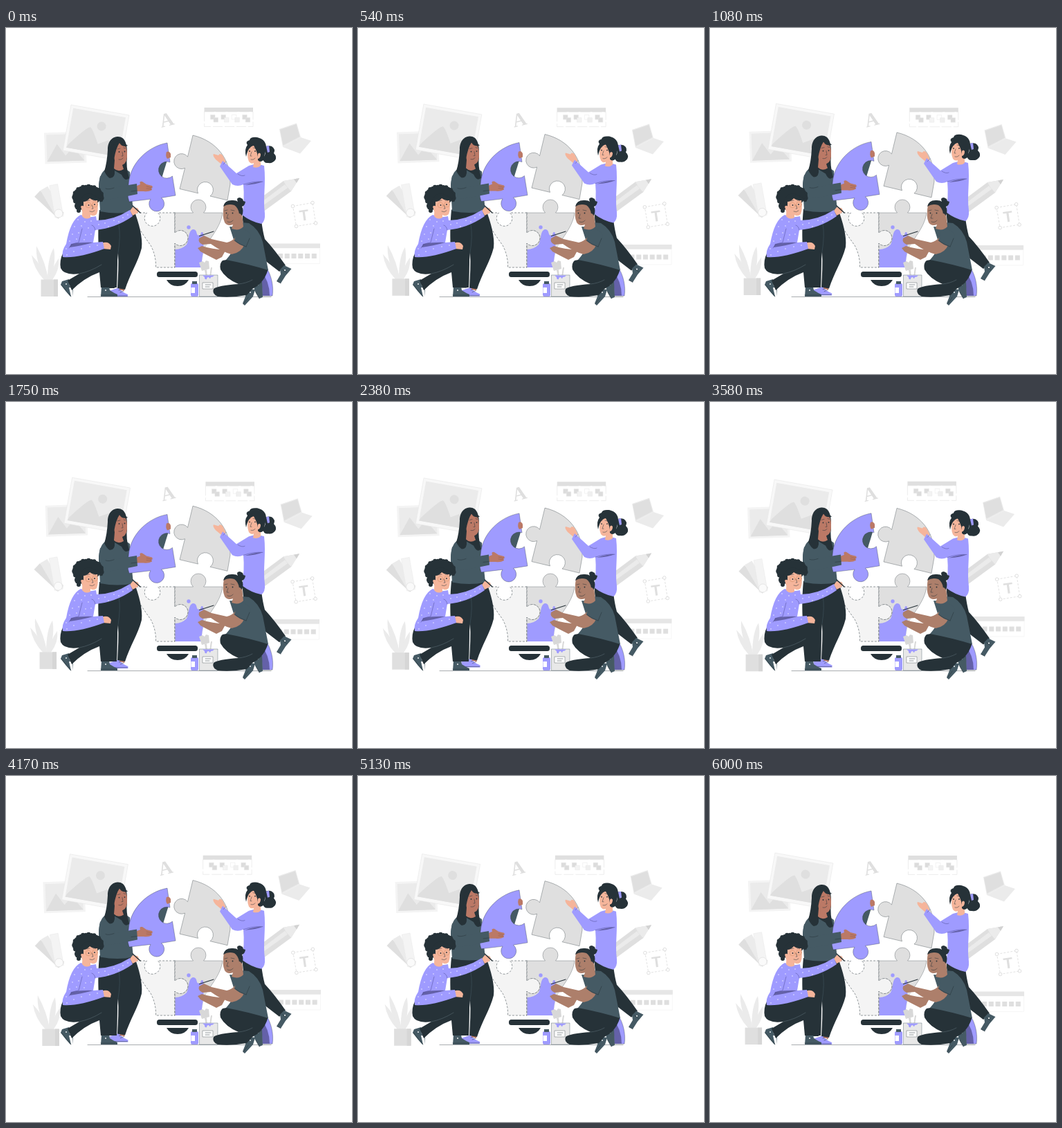
An HTML page for the animation above (6040 ms loop, 500x500 px).

```html
<!DOCTYPE html>
<html lang="en">
<head>
<meta charset="utf-8">
<title>Team building a bulb</title>
<style>
html, body { margin: 0; width: 100%; height: 100%; overflow: hidden; background: #fff }
svg { display: block; width: 100vw; height: 100vh }
.d { fill: #263238 } .t { fill: #455a64 } .p { fill: #9f9bff } .w { fill: #fff }
.b { fill: #bb7966 } .m { fill: #ad7f6b } .s { fill: #f5b59b } .v { fill: #6461a8 }
.g0 { fill: #f4f4f4 } .g1 { fill: #ebebeb } .g2 { fill: #dfdfdf }
.l { fill: none; stroke: #263238; stroke-width: .5; stroke-linecap: round }
.o { stroke: #263238; stroke-width: .35 }
.dash { stroke-dasharray: 3 2; stroke-width: .5 }
.f { fill: none; stroke: #e6e6e6; stroke-width: .7 }
</style>
</head>
<body>
<svg viewBox="0 0 500 500">
<!-- background objects -->
<g data-m="drift 1.7 -1.9">
  <g transform="translate(55 151.5) rotate(-2)">
    <path class="g0" d="M0 0H60V45H0z"/><path class="g1" d="M3 3H57V42H3z"/>
    <path class="g2" d="M3 42L18 17 30 34 41 22 57 42z"/>
  </g>
  <g transform="translate(94 111) rotate(10.1)">
    <path d="M0 0H85.3V67H0z" fill="#f8f8f8" stroke="#e8e8e8" stroke-width=".6"/>
    <path class="g1" d="M4 4H81V62H4z"/>
    <circle class="g2" cx="48.8" cy="22.8" r="6.5"/>
    <path class="g2" d="M4 62L6 57Q28 28 33 27Q36 27 48 49L62 41 81 59V62z"/>
  </g>
</g>
<g data-m="drift 1.8 -.4">
  <text class="g2" transform="translate(224.5 144) rotate(-14)" font-family="Liberation Serif, serif" font-weight="700" font-size="28">A</text>
</g>
<g data-m="drift 2 .3">
  <path class="f" d="M286.5 121H357V142.5H286.5z" stroke-dasharray="14 3"/>
  <path class="g2" d="M286.5 115H357V121H286.5z"/>
  <g id="icons"></g>
</g>
<g data-m="drift 1.7 1.7">
  <path class="g1" d="M395 146L420 137.5 426 158 400 172z"/>
  <path class="g2" d="M396 147L419.500 139 424.500 157 400.500 169.500z"/>
  <path class="g1" d="M400 172L426 158 441 163 425 181.500z"/>
</g>
<g data-m="drift 0 2.3">
  <path class="g2" d="M424 217L401 221 366 247 371 266 412 236z"/>
  <path class="g1" d="M424 217L401 221 405 228 412 236z"/>
  <path class="g1" d="M403 226L366 254 368 259 407 231z"/>
  <path fill="#d2d2d2" d="M424 217L416 218.500 420 224z"/>
</g>
<g data-m="drift -.4 2.4">
  <path class="f" d="M414.500 257.500L443 252.500 447.500 282 419.500 286.500z" stroke-dasharray="3 2" style="stroke:#d6d6d6"/>
  <g fill="#fff" stroke="#d6d6d6" stroke-width=".8"><circle cx="414.500" cy="257.500" r="2.300"/><circle cx="443" cy="252.500" r="2.300"/><circle cx="447.500" cy="282" r="2.300"/><circle cx="419.500" cy="286.500" r="2.300"/></g>
  <text class="g2" transform="translate(432 278) rotate(-8)" text-anchor="middle" font-family="Liberation Sans, sans-serif" font-weight="700" font-size="22">T</text>
</g>
<g data-m="drift -1 2.7">
  <path class="f" d="M379 318H453.500V340.500H379z" style="stroke:#f3f3f3"/>
  <path fill="#e6e6e6" d="M379 311.500H454V318H379z"/>
  <path d="M393 329.500H449" fill="none" stroke="#dfdfdf" stroke-width="7" stroke-dasharray="7 2.75"/>
</g>
<g data-m="drift -.6 -1.8">
  <g transform="translate(76 268)">
    <path class="g2" d="M-6 5V-42H6V5z" transform="rotate(-47)"/>
    <path class="g1" d="M-6 5V-42H6V5z" transform="rotate(-30)"/>
    <path class="g0" d="M-6 5V-42H6V5z" transform="rotate(-10)" stroke="#e8e8e8" stroke-width=".5"/>
    <circle r="6" fill="#fafafa" stroke="#dedede" stroke-width=".7"/>
  </g>
</g>
<g data-m="drift -2 -2.2">
  <g class="g1">
    <path d="M55 364Q40 348 37 328Q53 345 60 364z"/><path d="M57 364Q42 336 44 315Q58 340 61 364z"/>
    <path d="M60 364Q60 332 69 318Q73 338 64 364z"/><path d="M62 364Q66 347 76 333Q78 349 67 364z"/>
    <path d="M57 364Q49 354 52 342Q60 352 61 364z"/>
  </g>
  <path class="g2" d="M50.500 363.500H75V388H50.500z"/><path fill="#d6d6d6" d="M69 363.500H75V388H69z"/>
</g>

<path class="l" d="M118 388.500H383" style="stroke-width:.4"/>

<!-- lower half of the bulb -->
<path class="g0 o dash" d="M183 267H203.500A11.300 11.300 0 1 0 219.500 267H244V346H216.500Q217 329 209 314C199 300 187 284 183 267z"/>
<path class="g2" d="M244 267H270.500A11 11 0 1 1 285.500 267H313C311 284 300 297 292 310Q283 325 282.500 346H244z"/>
<path class="l" d="M244 267H270.500A11 11 0 1 1 285.500 267H313C311 284 300 297 292 310" style="stroke-width:.3"/>
<path class="p" d="M244.500 346V320Q254 320 261 313C265 306 263 293 270 291C277 290 274 300 279 300C283 300 280 294 284 295C288 300 284 310 286 320Q283 330 282.500 346z"/>
<circle class="p" cx="264" cy="288" r="2.700"/>
<path class="g0" d="M243 296A11 11 0 1 1 243 311z"/>
<path class="l dash" d="M244 267V296A11 11 0 1 1 244 311V346"/>
<rect class="d" x="218" y="352" width="59" height="8" rx="3.500"/>
<path class="d" d="M232 364H264Q259 373 248 373T232 364z"/>

<!-- paint supplies -->
<g fill="#d8d8d8"><path d="M279 339L284 337 287 339 289 336 293 337 294 348 283 351z"/><path d="M287 350L290 349 291 360H289zM296 346L298 346 296 360H294z"/></g>
<path fill="#e8e8e8" stroke="#455a64" stroke-width=".4" d="M279.500 357H306V388H279.500z"/>
<path class="p" d="M284 357.500H301Q299 360 296 360Q295 364 293 360Q290 360 290 363Q287 364 287 360z"/>
<path class="w o" d="M284 368H299V377H284z"/><path class="l" d="M288 371H296M288 374H294"/>
<rect class="p" x="267" y="369" width="11" height="19" rx="2"/><path class="t" d="M269 366H276V370H269z"/>
<path class="w" d="M267.500 375H273V383H267.500z"/>

<!-- standing woman, left -->
<g data-m="slow 2.5 -4"><path d="M200 205L218 190 233 191 225 217 210 220z" fill="#455a64"/></g>
<g data-m="slow .6 -5">
  <path class="p" d="M149 388V380L163 375Q166 381 176 385V388z"/>
  <path class="l" d="M149 387H175M163 379L168 378M165 382L170 380"/>
  <path class="b" d="M163 372H171V380L164 378z"/>
</g>
<g data-m="slow 0 -5">
  <path class="d" d="M135 263H185C192 282 198 303 196 318C191 338 179 356 172 378L161 376C162 358 163 342 162 325L157 376H140C135 345 131 304 135 263z"/>
  <path class="l" d="M162 325Q166 300 163 285" style="stroke:#455a64"/>
  <path class="t" d="M147 203C138 206 134 216 134 232L136 265Q162 270 184 265L181 236 179 208Q172 203 169 203z"/>
</g>
<g data-m="slow 0 -5.7">
  <path class="p o" d="M233 166C205 171 179 195 177 226Q174 240 178 251L209 247.300A11 11 0 1 0 224.500 245.400L245 242 240.500 214A12 12 0 1 1 237 194z"/>
  <path class="b" d="M232 179Q236 177 238 182V187L233 189Q230 185 232 179z"/>
  <path class="b" d="M189 228L194 226Q192 221 197 222L203 226 211 228Q213 231 210 231L211 234Q206 237 199 236L189 236z"/>
  <path class="l" d="M203 229L211 231M203 232L210 233" style="stroke:#8d5646"/>
</g>
<g data-m="slow 0 -5">
  <path class="t" d="M136 214Q131 238 139 247Q145 250 190 240L189 225Q170 228 157 231L153 213z"/>
  <path class="l" d="M156 231Q148 234 144 232M181 236L189 235"/>
  <path class="d" d="M147 176C147 162 155 157 162 157C172 157 176 168 175 186Q173 200 178 217Q172 223 167 212L157 206Q158 217 150 217Q146 215 142 207Q146 195 147 176z"/>
  <path class="b" d="M154 178Q154 168 162 166Q175 166 175 181Q176 195 168 198L170 204Q162 209 156 203L157 191z"/>
  <path class="d" d="M153 188Q151 167 164 162L176 170Q168 173 164 166Q159 173 156 190z"/>
  <path class="l" d="M161 175L165 174M170 173L173 174M168 179L169 185 167 185M163 190Q167 191 169 188"/>
  <g class="d"><circle cx="163.500" cy="179" r=".9"/><circle cx="171.500" cy="178.500" r=".9"/></g>
</g>

<!-- standing woman, right -->
<g data-m="fast 0 -5">
  <path class="g2 o" d="M270 155C304 163 326 190 324 226L320 249 295 243A11.500 11.500 0 1 0 277.500 238.800L251 232.500 258.500 202.500A11 11 0 1 1 262.500 186z"/>
  <path class="d" d="M342 270L369 278Q371 294 374 305Q388 320 404 343L395 352 360 325Q341 298 342 270z"/>
  <path class="t" d="M402 343L412.500 348 404 358 397 369 391 366 397 356 396 349z"/>
  <path class="l" d="M399 349L406 354M392 366L397 369"/><circle cx="403" cy="350" r="1" class="w"/>
  <path class="s" d="M315 200L303 190Q298 184 300 182L307 184Q309 180 313 184L317 192z"/>
  <path class="p" d="M313 192L333 210 351 199Q362 195 373 199C376 225 371 245 374 268Q375 279 369 283Q354 280 341 270Q345 248 343 226Q335 230 327 226Q318 213 309 200z"/>
  <path class="v" d="M345 227Q359 222 371 222Q362 226 345 227z"/>
  <path class="l" d="M343 226Q358 221 371 222M335 211Q341 215 345 213M314 197L318 193" style="stroke:#4d4a91"/>
  <path class="d" d="M373 172Q379 169 384 171Q390 175 387 181Q392 186 389 191Q385 196 379 195Q372 196 371 188Q376 183 374 178z"/>
  <path class="s" d="M351 169Q347 184 351 193Q354 197 358 195L357 201Q364 203 368 199V178L364 165z"/>
  <path class="d" d="M347 186Q344 175 349 169Q345 164 352 162Q353 157 363 158Q376 161 376 173Q374 182 372 191Q367 195 364 191Q365 182 358 170Q350 171 347 186z"/>
  <path class="p" d="M376 171L380 170 381 179 378 180z"/>
  <path class="s" d="M364 182Q366 179 368 182Q368 188 364 189z"/>
  <path class="l" d="M350 174L353 173M357 173L361 174M355 179L353 185 355 185M354 190Q358 191 360 188"/>
  <g class="d"><circle cx="352" cy="178" r=".9"/><circle cx="360" cy="178" r=".9"/></g>
</g>

<!-- painter -->
<path class="p o" d="M344 339L375 344C384 357 387 374 385 387H370Q373 364 344 339z"/>
<path class="v" d="M368 350Q381 366 381 387H371z"/>
<path class="t" d="M356 366L370 367 371 389 366 391 360 381zM347 376L360 378 357 388 345 401 342 398 346 388z"/>
<path class="l" d="M366 391L361 382M343 399L350 389"/><g class="w"><circle cx="364" cy="371" r=".9"/><circle cx="353" cy="382" r=".9"/></g>
<path class="d" d="M313 336Q342 329 375 344Q380 348 377 354Q371 370 356 377L348 386Q325 390 306 388Q297 384 300 377Q306 372 336 370Q317 362 310 349Q308 340 313 336z"/>
<path class="l" d="M336 370Q347 369 356 364" style="stroke:#60727b"/>
<path class="m" d="M277 318L283 315Q302 321 318 320L312 331 304 335Q290 328 281 323z"/>
<path class="t" d="M323 287Q334 288 341 281L351 282Q366 291 371 309L379 350Q350 341 318 335Q328 324 331 312z"/>
<path class="m" d="M333 301L345 312Q340 325 326 327Q311 323 296 312L284 313Q277 310 279 304L286 300 297 305 319 310Q326 309 333 301z"/>
<path class="t" d="M336 287Q351 292 354 300L347 316Q337 314 330 307z"/>
<path class="l" d="M347 316L352 304M330 307Q338 313 347 316"/>
<path class="l" d="M278 301L300 294" style="stroke-width:1.2"/><path class="p" d="M273 302L279 299 279 302z"/>
<path class="m" d="M315 255Q312 273 316 281Q320 287 328 284L326 290Q337 294 343 287L340 258Q329 247 315 255z"/>
<path class="d" d="M314 258Q316 248 328 249Q333 249 335 251Q332 245 338 245L342 247 343 250 346 251Q345 257 341 258Q344 264 341 271L337 269Q336 260 330 256Q321 253 314 258z"/>
<path class="m" d="M335 270Q337 266 340 270Q340 276 335 277z"/>
<path class="l" d="M316 264L320 263M325 263L330 264M321 269L319 275 322 275M320 280Q325 282 328 278"/>
<g class="d"><circle cx="318.500" cy="267.500" r=".9"/><circle cx="327.500" cy="267.500" r=".9"/></g>

<!-- kneeling woman -->
<path class="t" d="M81 366L91 363 92 373 97 377V388H93L86 380 79 371zM138 374H149L150 379Q156 383 161 385V388H137z"/>
<path class="w" d="M91 375H96L97 388H94z"/>
<path class="l" d="M80 371L94 388M137 386H160"/><g class="w"><circle cx="87" cy="370" r=".9"/><circle cx="144" cy="379" r=".9"/></g>
<path class="d" d="M82 326Q120 312 150 317Q160 319 161 330Q161 355 160 375H137L135 353Q113 361 95 379L89 365 106 355Q84 358 79 347Q77 336 82 326z"/>
<path class="l" d="M106 355Q122 352 138 342" style="stroke:#60727b"/>
<path class="s" d="M179 264L183 259 190 260Q194 264 189 268L183 271zM138 311Q148 307 152 315L151 320 140 319z"/>
<path class="p" d="M108 270Q119 275 130 272L131 278Q155 278 179 263L183 272Q159 289 129 292L126 310 140 309 142 319Q104 333 82 331Q80 322 87 312Q93 277 108 270z"/>
<path class="v" d="M94 312Q113 309 126 310Q108 315 92 317z"/>
<path class="l" d="M110 290L105 310Q94 311 91 318M129 292Q128 286 124 285" style="stroke:#4d4a91"/>
<g class="w" id="dots"></g>
<path class="l" d="M183 257L194 267" style="stroke-width:1.5"/>
<g class="d" id="curls"></g>
<path class="s" d="M111 248Q126 240 132 249Q134 262 131 269Q127 273 122 270V274Q115 278 110 272z"/>
<path class="d" d="M106 253Q110 238 122 239L137 247Q128 252 121 246Q117 251 112 251V262L106 263z"/>
<path class="s" d="M108 258Q111 255 113 259Q114 265 110 265z"/>
<g class="l"><circle cx="119" cy="256" r="3.800" style="stroke:#d18a5f"/><circle cx="128.500" cy="255" r="3.800" style="stroke:#d18a5f"/><path d="M117 250L121 249M126 249L130 249M124 256L126 261 124 261M121 265Q125 267 128 264"/></g>
<g class="d"><circle cx="119.500" cy="256" r=".9"/><circle cx="128" cy="255" r=".9"/></g>
</svg>
<script>
const get = id => document.getElementById(id);
const dot = (x, y, r) => `<circle cx="${x}" cy="${y}" r="${r}"/>`;

// overlapping square pairs in the upper toolbar
const square = (x, y, fill) => `<path d="M${x} ${y}h6.5v6.5h-6.500z" fill="${fill}" stroke="#e6e6e6" stroke-width=".5"/>`;
get('icons').innerHTML = [['#dcdcdc', '#dcdcdc'], ['#dcdcdc', '#f4f4f4'], ['#fff', '#f0f0f0'], ['#dcdcdc', '#dcdcdc']]
  .map(([a, b], i) => square(295.5 + i * 15.4, 125.5, a) + square(300 + i * 15.4, 129.5, b)).join('');

// curls around the kneeling woman's head
let curls = '';
for (let i = 0; i < 21; i++) {
  const a = 2.5 + i * .205;
  curls += dot(118.5 + 20 * Math.cos(a), 244 + 15 * Math.sin(a), i % 2 ? 3.2 : 2.5);
}
get('curls').innerHTML = curls + '<ellipse cx="118.5" cy="243" rx="19" ry="14"/>' + dot(105, 257, 6) + dot(105, 264, 3);

// sweater dots
const spots = [[104, 277], [114, 280], [123, 279], [99, 287], [109, 286], [119, 289], [96, 298], [105, 296],
  [115, 299], [123, 298], [92, 308], [102, 305], [113, 306], [87, 319], [98, 323], [109, 319], [121, 316],
  [132, 314], [88, 328], [134, 284], [143, 282], [148, 287], [156, 278], [163, 280], [169, 274], [176, 270]];
get('dots').innerHTML = spots.map(([x, y]) => dot(x, y, .65)).join('');

const LOOP = 6040;
const parts = [...document.querySelectorAll('[data-m]')].map(el => {
  const [wave, dx, dy] = el.dataset.m.split(' ');
  return { el, wave, dx: +dx, dy: +dy };
});

function draw(now) {
  const a = now % LOOP / LOOP * 2 * Math.PI;
  const waves = {
    drift: Math.sin(a),
    slow: (1 - Math.cos(a)) / 2,
    fast: (1 - Math.cos(2 * a)) / 2
  };
  for (const { el, wave, dx, dy } of parts)
    el.setAttribute('transform', `translate(${dx * waves[wave]} ${dy * waves[wave]})`);
  requestAnimationFrame(draw);
}
draw(performance.now());
</script>
</body>
</html>
```
